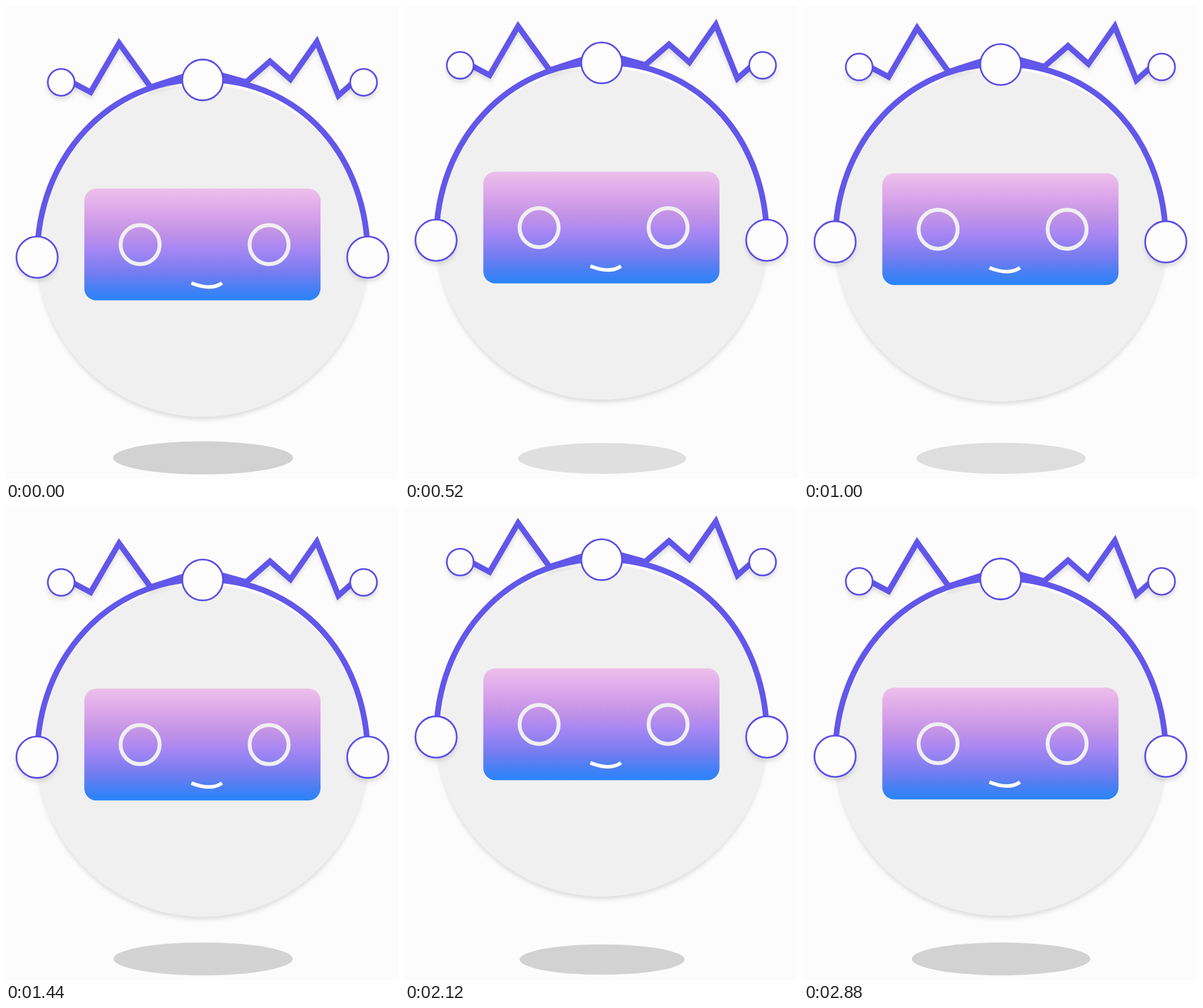
Write an HTML page that moves like this. It is 655 by 787 pixels and loops after 2.92 s.

```html
<!DOCTYPE html>
<html lang="en">
<head>
<meta charset="utf-8">
<title>Floating robot</title>
<style>
  html, body { margin: 0; width: 100%; height: 100%; overflow: hidden; background: #fcfcfc; }
  svg { display: block; width: 655px; height: 787px; }
</style>
</head>
<body>
<svg viewBox="0 0 655 787">
  <defs>
    <linearGradient id="visor" x1="0" y1="0" x2="0" y2="1">
      <stop offset="0" stop-color="#edc0ea"/>
      <stop offset=".2" stop-color="#dca6ea"/>
      <stop offset=".4" stop-color="#c092e6"/>
      <stop offset=".53" stop-color="#aa87f3"/>
      <stop offset=".75" stop-color="#767cf0"/>
      <stop offset=".88" stop-color="#4b7ff3"/>
      <stop offset="1" stop-color="#2884fa"/>
    </linearGradient>
    <filter id="soft" filterUnits="userSpaceOnUse" x="0" y="0" width="655" height="787">
      <feDropShadow dx="0" dy="5.5" stdDeviation="3" flood-color="#000" flood-opacity=".11"/>
    </filter>
  </defs>
  <ellipse id="shadow" cx="328.5"/>
  <g id="robot">
    <circle cx="327.5" cy="407" r="276" fill="#f0f0f0" filter="url(#soft)"/>
    <g fill="none" stroke="#6257ea" stroke-width="9.5">
      <g filter="url(#soft)">
        <path d="M108 126L141 143.5L188.5 62L241 135L300 116"/>
        <path d="M580 126L554 149L518 59.5L474 122L440 92L401 126"/>
      </g>
      <path d="M52 418C52 252 172 122 328 122C496 122 603 256 603 418M355 114L402 127"/>
    </g>
    <g fill="#fdfdfd" stroke="#5a4de6" stroke-width="2.8">
      <g filter="url(#soft)">
        <circle cx="51.8" cy="418" r="34.4"/>
        <circle cx="603" cy="418" r="34.4"/>
        <circle cx="92" cy="127" r="22.3"/>
        <circle cx="596" cy="127" r="22.3"/>
      </g>
      <circle cx="327.8" cy="123" r="34"/>
    </g>
    <rect x="130.5" y="303.8" width="393.7" height="186" rx="20" fill="url(#visor)"/>
    <g fill="none" stroke="#f0f0f0" stroke-width="6.5">
      <circle cx="223.5" cy="397" r="32.5"/>
      <circle cx="438.5" cy="397" r="32.5"/>
      <path d="M309 461Q342 474 360 461" stroke="#fdfdfd" stroke-width="6"/>
    </g>
  </g>
</svg>
<script>
  const LOOP = 2920, STEP = 40, BOUNCE = 1470, LIFT = 40;

  const robot = document.getElementById('robot');
  const shadow = document.getElementById('shadow');

  function draw(t) {
    // Steady rise and fall, 0 at rest and 1 at the top.
    const height = 1 - Math.abs(1 - 2 * (t % BOUNCE) / BOUNCE);
    robot.setAttribute('transform', `translate(0 ${-LIFT * height})`);

    // The shadow narrows with height and also pales on the first bounce.
    const rx = 150 - 14 * height;
    const gray = Math.round(210 + (t < BOUNCE ? 18 * height : 0));
    shadow.setAttribute('rx', rx);
    shadow.setAttribute('ry', rx * 27.5 / 150);
    shadow.setAttribute('cy', 751.8 + 1.3 * height);
    shadow.setAttribute('fill', `rgb(${gray},${gray},${gray})`);
  }

  const start = performance.now();
  function tick() {
    const t = (performance.now() - start) % LOOP;
    draw(Math.floor(t / STEP) * STEP);
    requestAnimationFrame(tick);
  }
  tick();
</script>
</body>
</html>
```
